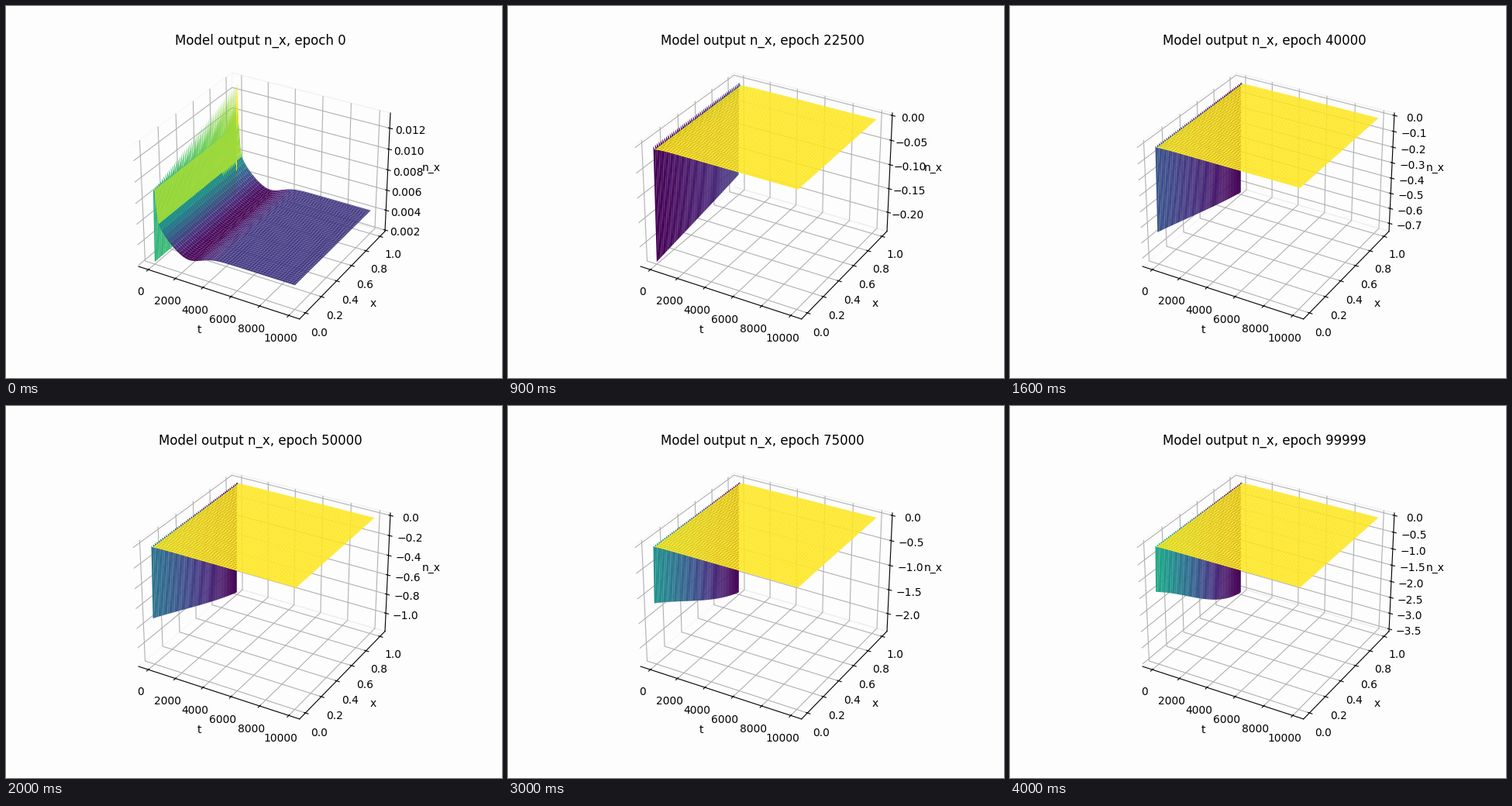
These frames come from a looping animation (640x480 px, 4.1 s). A matplotlib script:

```python
import numpy as np
import matplotlib.pyplot as plt
from matplotlib.animation import FuncAnimation

FRAMES = 41
PAPER = "#fdfdfd"

t = np.linspace(0, 10000, 100)
x = np.linspace(0, 1, 100)
T, X = np.meshgrid(t, x)


def untrained(t):
    """Surface of the fresh network: a steep drop, a valley, a plateau."""
    decay = 0.0032 * np.exp(-t / 700) + 0.0034 * np.exp(-(t / 280) ** 4)
    valley = 0.0009 * np.exp(-(((t - 2500) / 1300) ** 2))
    return 0.0042 + decay - valley


def edge_depth(s):
    """How far the row at t = 0 has sunk, from x = 0 to x = 1."""
    near = np.interp(s, [0.1, 0.225, 0.5, 0.75, 1], [0.189, 0.236, 0.72, 1.13, 1.36])
    far = 4.7 * 0.08 * np.log1p(np.exp((s - 0.255) / 0.08))
    sag = 1.6 * s**4 * x**2 * (1 - x)
    return near + (far - near) * x + sag


def output(s):
    """Network output over (x, t) at training progress s from 0 to 1."""
    fresh = max(0, 1 - s / 0.1)
    level = -0.004 * min(1, s / 0.225)
    row = fresh * untrained(t) + level - 0.018 * s * np.exp(-t / 400)
    Z = np.tile(row, (len(x), 1))
    Z[:, 0] = fresh * 0.0021 - (1 - fresh) * edge_depth(s)
    # Overshoot right after t = 0
    bump = 0.008 * max(0, 1 - abs(s - 0.1) / 0.1)
    Z[:, 1] = fresh * (0.0091 + 0.0041 * x) + bump
    return Z


fig = plt.figure(figsize=(6.4, 4.8), dpi=100, facecolor=PAPER)
ax = fig.add_subplot(projection="3d")


def draw(i):
    epoch = min(2500 * i, 99999)
    ax.clear()
    ax.set_facecolor(PAPER)
    ax.plot_surface(T, X, output(epoch / 100000), cmap="viridis")
    for axis in (ax.xaxis, ax.yaxis, ax.zaxis):
        axis.pane.fill = False
    ax.set_xlabel("t")
    ax.set_ylabel("x")
    ax.set_zlabel("n_x")
    ax.set_title(f"Model output n_x, epoch {epoch}")


anim = FuncAnimation(fig, draw, frames=FRAMES, interval=100, repeat=True,
                     init_func=lambda: None)
plt.show()
```
